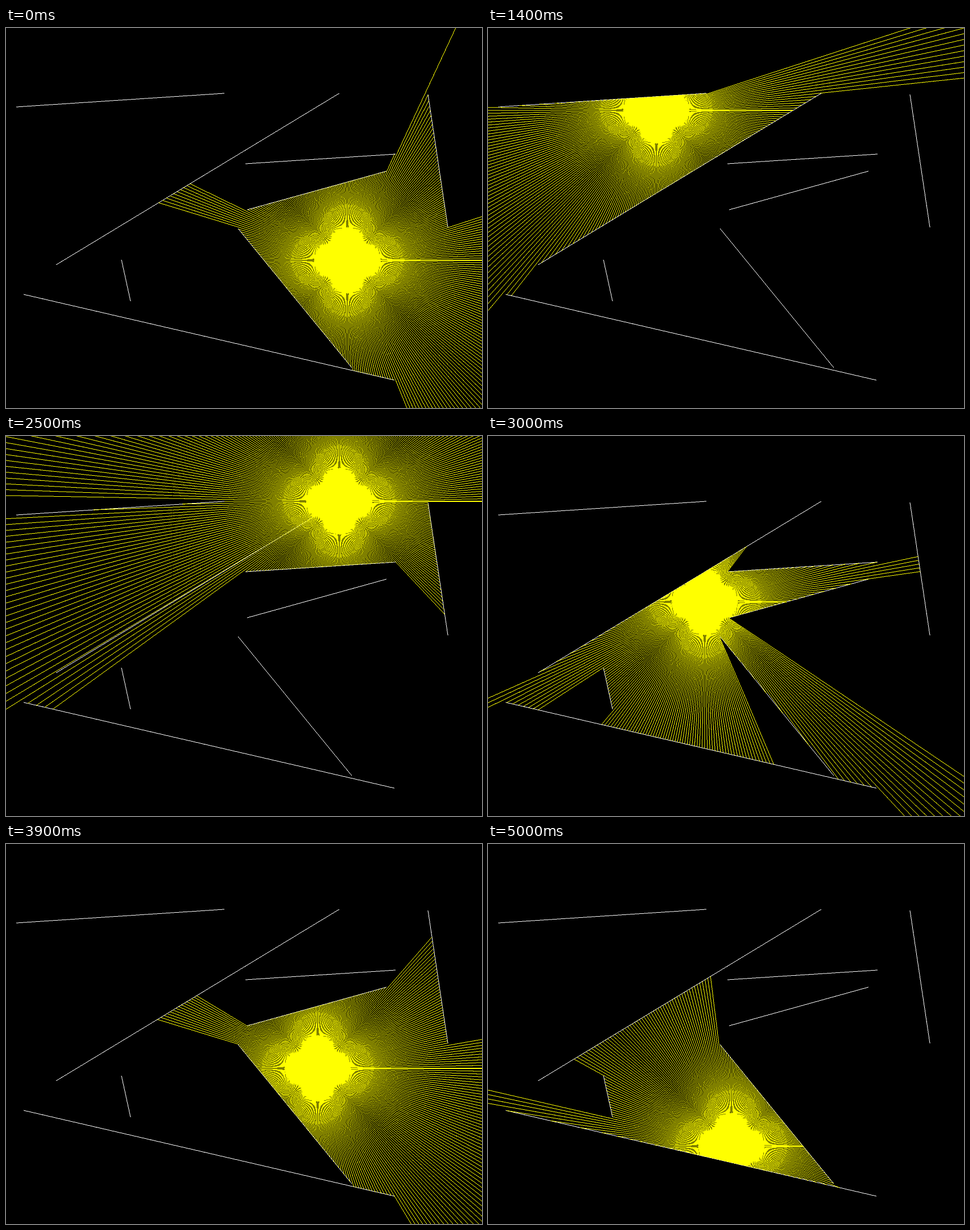
Write an HTML page with a canvas that moves like this. It is 837x669 px and loops after 5.1 s.

```html
<!DOCTYPE html>
<html lang="en">
<head>
<meta charset="utf-8">
<title>Ray casting</title>
<style>
  html, body { margin: 0; width: 100%; height: 100%; overflow: hidden; background: #000; }
  canvas { display: block; }
</style>
</head>
<body>
<canvas id="stage" width="837" height="669"></canvas>
<script>
const W = 837, H = 669, LOOP = 5100, STEP = 100, HOLD = 200, FAR = 1200;

// x1, y1, x2, y2
const walls = [
  [18, 139, 384, 115],
  [88, 417, 586, 115],
  [421, 239, 685, 222],
  [424, 320, 669, 252],
  [742, 117, 777, 351],
  [408, 353, 608, 598],
  [203, 408, 219, 481],
  [31, 469, 683, 620]
];

// Turning points of the light
const path = [
  { t: 100, x: 600, y: 409 },
  { t: 400, x: 470, y: 350 },
  { t: 800, x: 253, y: 176 },
  { t: 1300, x: 275, y: 152 },
  { t: 2000, x: 468, y: 104 },
  { t: 2600, x: 585, y: 130 },
  { t: 3000, x: 381, y: 292 },
  { t: 3500, x: 449, y: 346 },
  { t: 4300, x: 633, y: 454 },
  { t: 4650, x: 590, y: 552 },
  { t: 5000, x: 428, y: 532 }
];

const ctx = document.getElementById("stage").getContext("2d", { willReadFrequently: true });
ctx.lineWidth = 1;

function line(x1, y1, x2, y2, color) {
  ctx.strokeStyle = color;
  ctx.beginPath();
  ctx.moveTo(x1, y1);
  ctx.lineTo(x2, y2);
  ctx.stroke();
}

// Distance along the ray to the nearest wall
function reach(x, y, dx, dy) {
  let best = FAR;
  for (const [x1, y1, x2, y2] of walls) {
    const wx = x2 - x1, wy = y2 - y1;
    const det = dx * wy - dy * wx;
    if (Math.abs(det) < 1e-9) continue;
    const px = x1 - x, py = y1 - y;
    const dist = (px * wy - py * wx) / det;
    const along = (px * dy - py * dx) / det;
    if (dist > 0 && dist < best && along >= 0 && along <= 1) best = dist;
  }
  return best;
}

function slope(i, axis) {
  const a = path[Math.max(i - 1, 0)], b = path[Math.min(i + 1, path.length - 1)];
  return (b[axis] - a[axis]) / (b.t - a.t);
}

// Smooth Hermite curve through the turning points
function lightAt(time) {
  const t = Math.max(path[0].t, time);
  let i = 0;
  while (i < path.length - 2 && t >= path[i + 1].t) i++;
  const a = path[i], b = path[i + 1], span = b.t - a.t;
  const u = (t - a.t) / span, v = 1 - u;
  return ["x", "y"].map(k => Math.round(
    a[k] * (1 + 2 * u) * v * v + b[k] * u * u * (3 - 2 * u) +
    span * u * v * (slope(i, k) * v - slope(i + 1, k) * u)
  ));
}

// Reduce every channel to off, half or full.
function flatten() {
  const image = ctx.getImageData(0, 0, W, H), d = image.data;
  for (let i = 0; i < d.length; i++) d[i] = d[i] > 188 ? 255 : d[i] > 64 ? 128 : 0;
  ctx.putImageData(image, 0, 0);
}

function draw(t) {
  const [x, y] = lightAt(t);
  ctx.fillStyle = "#000";
  ctx.fillRect(0, 0, W, H);
  for (const w of walls) line(...w, "#fff");
  // The first ray is drawn again at the full turn, which makes it brighter.
  for (let deg = 0; deg <= 360; deg++) {
    const a = deg * Math.PI / 180, dx = Math.cos(a), dy = Math.sin(a);
    const r = reach(x, y, dx, dy);
    line(x, y, x + dx * r, y + dy * r, "#ff0");
  }
  flatten();
}

const start = performance.now();
let shown = -1;

function tick() {
  const t = Math.max(0, performance.now() - start) % LOOP;
  const now = t < HOLD ? 0 : Math.floor(t / STEP) * STEP;
  if (now !== shown) {
    shown = now;
    draw(now);
  }
  requestAnimationFrame(tick);
}
tick();
</script>
</body>
</html>
```
